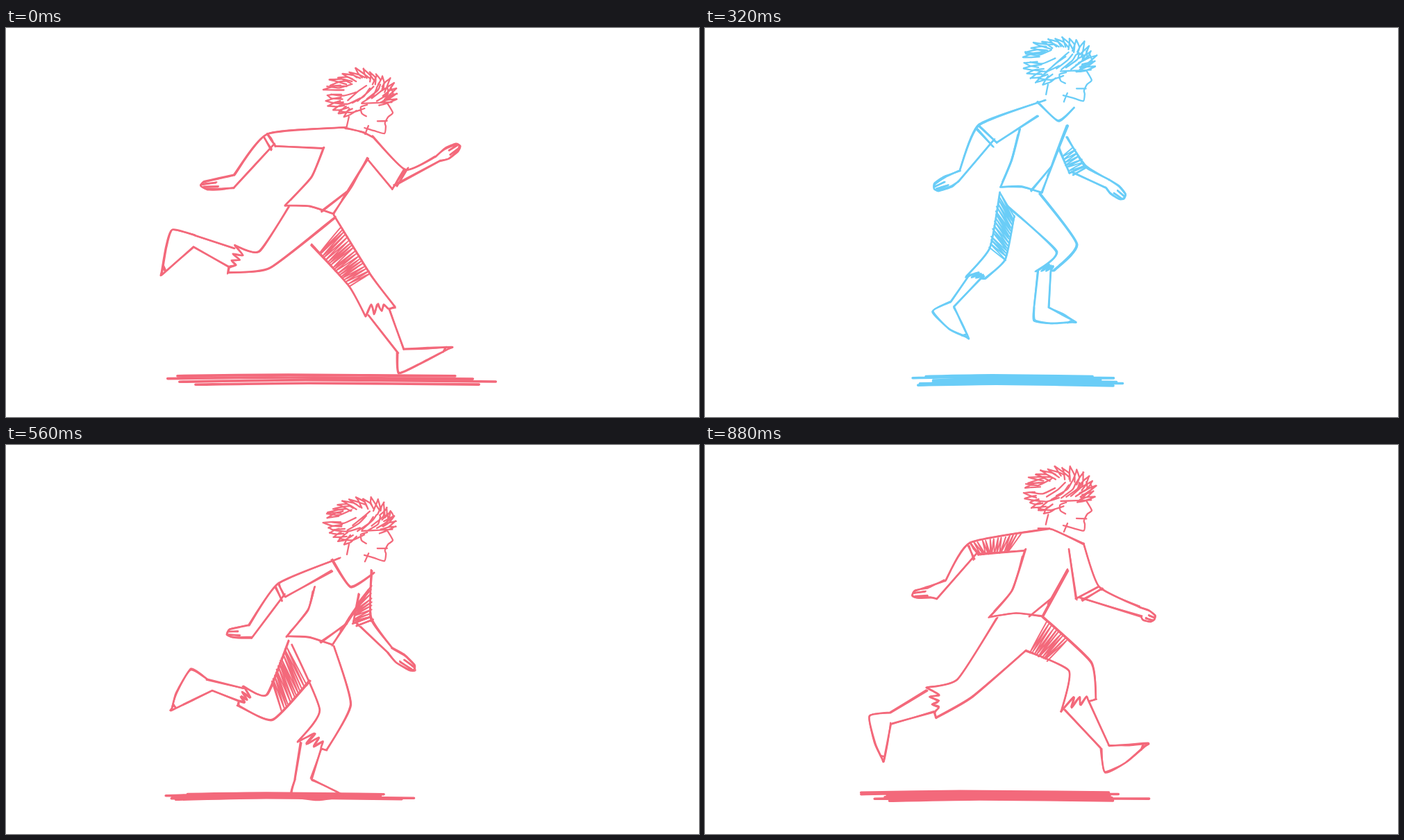
An HTML page that plays this animation: 998x561 px, repeating every 0.96 s.

```html
<!DOCTYPE html>
<html lang="en">
<head>
<meta charset="utf-8">
<title>Run cycle</title>
<style>
html, body { margin: 0; width: 100%; height: 100%; overflow: hidden; background: #fff; }
svg { display: block; width: 998px; height: 561px; }
path { fill: none; stroke-linecap: round; stroke-linejoin: round; }
g { visibility: hidden; animation: show 960ms step-end infinite; }
@keyframes show {
  0% { visibility: visible; }
  8.33333%, 100% { visibility: hidden; }
}
</style>
</head>
<body>
<svg id="stage" viewBox="0 0 998 561"></svg>
<script>
const RED = '#f3697b', GREEN = '#78c475', LIME = '#aad471', BLUE = '#6acdf7';
const STEP = 80, COUNT = 12;

// torso: left shoulder, collar, right shoulder, back (3), front (2)
// arms: outer and inner side of shoulder, elbow, wrist; then the fingertip
// legs: front and back side of hip, knee, cuff, ankle; then toe, sole, heel
const contact = {
  color: RED, head: 0, ground: [233, 705, 501, 513], lines: 4, shade: [0.2, 1], shadedArm: '',
  torso: [488, 144, 513, 150, 528, 157, 458, 172, 440, 215, 402, 256, 521, 188, 472, 268],
  armL: [490, 143, 455, 174, 376, 153, 388, 170, 328, 212, 328, 231, 281, 228],
  armR: [528, 156, 521, 190, 575, 204, 556, 232, 618, 186, 624, 192, 654, 170],
  near: [474, 272, 407, 258, 380, 346, 364, 322, 320, 353, 330, 314, 270, 316, 272, 299, 224, 356, 231, 316, 240, 291],
  far: [472, 270, 440, 312, 524, 355, 494, 372, 560, 402, 518, 416, 573, 463, 564, 468, 642, 460, 600, 482, 566, 497]
};
const down = {
  color: GREEN, head: 15, ground: [211, 597, 503, 512], lines: 5, shade: [0.1, 1], shadedArm: 'armL',
  torso: [470, 165, 490, 163, 525, 176, 480, 168, 446, 215, 408, 271, 497, 236, 468, 282],
  armL: [470, 165, 447, 206, 392, 196, 410, 218, 362, 268, 372, 280, 335, 282],
  armR: [525, 176, 494, 190, 528, 250, 502, 262, 566, 299, 552, 306, 604, 328],
  near: [465, 290, 404, 280, 382, 397, 373, 372, 335, 378, 343, 346, 292, 349, 290, 335, 231, 388, 243, 355, 264, 323],
  far: [470, 287, 447, 335, 508, 390, 472, 386, 463, 444, 437, 424, 454, 475, 434, 468, 509, 494, 460, 498, 421, 498]
};
const pass = {
  color: BLUE, head: -3, ground: [353, 548, 502, 513], lines: 6, shade: [0, 1], shadedArm: 'armR',
  torso: [470, 155, 510, 178, 518, 150, 446, 205, 436, 240, 426, 277, 514, 185, 480, 283],
  armL: [490, 150, 494, 166, 407, 204, 438, 228, 394, 275, 405, 280, 370, 307],
  armR: [496, 236, 488, 246, 526, 261, 512, 265, 538, 268, 524, 274, 552, 300],
  near: [475, 284, 422, 285, 522, 370, 490, 376, 448, 396, 438, 380, 412, 432, 378, 432, 425, 484, 396, 456, 378, 434],
  far: [440, 312, 424, 290, 480, 368, 452, 360, 482, 398, 434, 428, 450, 468, 434, 470, 498, 497, 460, 500, 421, 492]
};
const up = {
  color: BLUE, head: -27, ground: [245, 655, 501, 516], lines: 6, shade: [0.05, 0.5], shadedArm: 'armR',
  torso: [488, 122, 508, 155, 545, 143, 462, 150, 447, 205, 425, 246, 530, 160, 490, 256],
  armL: [490, 122, 465, 153, 382, 141, 402, 166, 340, 200, 324, 228, 290, 222],
  armR: [545, 143, 530, 165, 570, 200, 538, 218, 626, 234, 630, 250, 655, 256],
  near: [490, 256, 450, 292, 550, 318, 522, 333, 558, 368, 516, 385, 578, 437, 570, 438, 643, 428, 600, 460, 572, 472],
  far: [450, 296, 425, 248, 385, 364, 368, 338, 324, 388, 319, 352, 267, 400, 272, 385, 262, 462, 243, 432, 236, 388]
};
const down2 = {
  color: RED, head: 15, ground: [230, 587, 503, 510], lines: 5, shade: [0.1, 0.75], shadedArm: 'armR',
  torso: [470, 165, 496, 204, 530, 184, 444, 205, 435, 238, 404, 276, 522, 210, 470, 288],
  armL: [480, 163, 470, 182, 392, 200, 402, 219, 350, 260, 354, 278, 319, 272],
  armR: [526, 180, 508, 215, 526, 248, 500, 257, 556, 292, 550, 300, 588, 324],
  near: [472, 290, 412, 288, 496, 374, 452, 382, 462, 440, 420, 428, 440, 482, 416, 482, 488, 506, 450, 511, 412, 505],
  far: [438, 340, 407, 282, 384, 397, 375, 360, 334, 375, 342, 348, 297, 354, 290, 338, 238, 383, 245, 357, 266, 324]
};
const pass2 = {
  color: LIME, head: -4, ground: [281, 559, 502, 508], lines: 4, shade: [0.1, 1], shadedArm: 'armL',
  torso: [480, 148, 500, 149, 520, 158, 460, 168, 442, 230, 414, 278, 490, 210, 475, 288],
  armL: [480, 148, 450, 200, 406, 204, 430, 228, 398, 262, 413, 270, 404, 298],
  armR: [520, 158, 494, 185, 512, 236, 482, 246, 546, 268, 538, 284, 554, 313],
  near: [470, 288, 410, 282, 452, 392, 414, 380, 408, 438, 386, 418, 381, 470, 350, 470, 410, 506, 372, 502, 348, 478],
  far: [470, 288, 462, 340, 466, 406, 450, 390, 410, 438, 395, 404, 366, 428, 333, 420, 356, 468, 345, 470, 332, 420]
};
const up2 = {
  color: RED, head: -28, ground: [225, 640, 500, 512], lines: 6, shade: [0.1, 0.5], shadedArm: 'armL',
  torso: [480, 121, 500, 122, 545, 143, 462, 150, 442, 210, 410, 248, 522, 180, 486, 247],
  armL: [495, 121, 460, 152, 382, 141, 394, 158, 346, 196, 334, 222, 299, 217],
  armR: [545, 142, 524, 150, 567, 204, 534, 222, 626, 234, 628, 248, 647, 252],
  near: [462, 296, 420, 250, 384, 364, 364, 338, 333, 394, 319, 350, 268, 402, 267, 386, 257, 456, 245, 430, 237, 391],
  far: [486, 248, 462, 296, 556, 314, 524, 326, 563, 366, 513, 384, 582, 434, 570, 437, 638, 430, 606, 458, 576, 472]
};

const lerp = (a, b, t) => a + (b - a) * t;
const between = (p, q, t) => [lerp(p[0], q[0], t), lerp(p[1], q[1], t)];
const points = n => Array.from({ length: n.length / 2 }, (_, i) => [n[2 * i], n[2 * i + 1]]);

function rng(seed) {
  return () => {
    seed = (seed * 1664525 + 1013904223) >>> 0;
    return seed / 4294967296;
  };
}

function blend(a, b, color, dy) {
  const out = { ...a, color, head: (a.head + b.head) / 2 + dy };
  for (const k of ['torso', 'armL', 'armR', 'near', 'far'])
    out[k] = a[k].map((v, i) => lerp(v, b[k][i], 0.5) + (i % 2 ? dy : 0));
  out.ground = a.ground.map((v, i) => lerp(v, b.ground[i], 0.5));
  return out;
}

// Zigzag between the edges a-b and c-d.
function zigzag(a, b, c, d, n) {
  const pts = [];
  for (let i = 0; i <= n; i++) pts.push(between(a, b, i / n), between(c, d, i / n));
  return pts;
}

function shadeLimb(limb, from, to, gap) {
  const [a, b, c, d] = points(limb);
  const n = Math.ceil(Math.hypot(a[0] - c[0], a[1] - c[1]) * (to - from) / gap);
  return zigzag(between(a, c, from), between(a, c, to), between(b, d, from), between(b, d, to), n);
}

function leg(n) {
  const [hf, hb, kf, kb, cf, cb, af, ab, toe, sole, heel] = points(n);
  const shin = between(cf, cb, 0.2), calf = between(cf, cb, 0.9);
  const tear = [0.2, 0.45, 0.7].flatMap((t, i) => [between(cf, cb, t), between(between(cf, cb, t + 0.1), kf, 0.15 + i * 0.05)]);
  return [
    [hf, kf, cf], [hb, kb, cb], [cf, ...tear, cb], [shin, af], [calf, ab],
    [af, between(af, toe, 0.5), toe, between(toe, sole, 0.15), sole, heel, ab],
    [between(toe, af, 0.12), between(toe, sole, 0.3)]
  ];
}

function arm(n) {
  const [so, si, eo, ei, wo, wi, tip] = points(n);
  const mid = between(wo, wi, 0.5), dx = tip[0] - mid[0], dy = tip[1] - mid[1];
  const len = Math.hypot(dx, dy), side = Math.sign(dx * (wo[1] - wi[1]) - dy * (wo[0] - wi[0])) || 1;
  const at = (t, w) => [mid[0] + dx * t - dy / len * w * side, mid[1] + dy * t + dx / len * w * side];
  return [
    [so, eo, wo], [si, ei], [between(eo, ei, 0.85), wi],
    [wo, at(0.45, 8), at(0.9, 6), tip, at(0.85, -5), at(0.4, -8), wi],
    [eo, between(eo, ei, 0.5), ei], [between(eo, wo, 0.08), between(ei, wi, 0.1)],
    [at(0.95, 3), at(0.55, 2)], [at(0.92, -2), at(0.5, -4)]
  ];
}

function torso(n) {
  const [left, collar, right, back, waist, hemL, front, hemR] = points(n);
  const bottom = between(hemL, hemR, 0.5);
  return [
    [left, collar, right], [back, waist, hemL], [between(back, waist, 0.2), waist, between(waist, hemL, 0.8)],
    [front, between(front, hemR, 0.5), hemR], [front, between(front, hemR, 0.75)],
    [hemL, [bottom[0], bottom[1] - 5], hemR],
    [between(hemL, hemR, 0.75), between(hemR, front, 0.4)]
  ];
}

function face(dy) {
  const at = list => points(list).map(([x, y]) => [x, y + dy]);
  return [
    [549, 108, 557, 122, 550, 128, 546, 137, 547, 142, 545, 152, 530, 148, 516, 144],
    [535, 134, 549, 134], [520, 111, 511, 114, 512, 123, 519, 127],
    [494, 128, 491, 143], [522, 141, 517, 153], [512, 109, 556, 107]
  ].map(at);
}

// Tufts around the skull, swept back, with loose strands above the brow.
function hair(dy, rand) {
  const cx = 511, cy = 96 + dy, out = [];
  const ring = (deg, r) => {
    const a = deg * Math.PI / 180;
    return [cx + Math.cos(a) * 52 * r, cy + Math.sin(a) * 37 * r];
  };
  for (let a = 118; a < 372; a += 12) {
    const tip = ring(a, 0.9 + rand() * 0.16), lean = a > 180 ? 20 : -8;
    const r = 0.5 + rand() * 0.2;
    out.push([ring(a + lean - 9, r), ring(a + lean * 0.4 - 5, 0.83), tip]);
    out.push([tip, ring(a + lean * 0.5 + 6, 0.78), ring(a + lean + 10, r)]);
  }
  for (let i = 0; i < 8; i++) {
    const x = 492 + i * 7, y = cy + 14 - rand() * 9;
    out.push([[x, y], [x + 16, y - 9 - rand() * 5], [x + 27 - i * 2, y - 21]]);
  }
  for (let i = 0; i < 4; i++) {
    const x = 462 + i * 6, y = cy - 12 + i * 12;
    out.push([[x, y], [x + 18, y + 2], [x + 36, y - 3 - rand() * 5]]);
  }
  return out;
}

function ground([x0, x1, y0, y1], n, rand) {
  return Array.from({ length: n }, (_, i) => {
    const y = lerp(y0, y1, i / (n - 1)), w = x1 - x0;
    const l = i === 1 ? x0 : x0 + rand() * w * 0.12;
    const r = i === n - 2 ? x1 : x1 - rand() * w * 0.15;
    return [[l, y + 1], [lerp(l, r, 0.4), y - 1], [r, y + 1]];
  });
}

function curve(p, rand, wobble) {
  const q = p.map(([x, y]) => [x + (rand() - 0.5) * wobble, y + (rand() - 0.5) * wobble]);
  const f = (x, y) => x.toFixed(1) + ' ' + y.toFixed(1);
  let d = 'M' + f(...q[0]);
  for (let i = 0; i < q.length - 1; i++) {
    const a = q[i - 1] || q[i], b = q[i], c = q[i + 1], e = q[i + 2] || c, k = 0.1;
    d += 'C' + f(b[0] + (c[0] - a[0]) * k, b[1] + (c[1] - a[1]) * k) + ' ' +
      f(c[0] - (e[0] - b[0]) * k, c[1] - (e[1] - b[1]) * k) + ' ' + f(...c);
  }
  return d;
}

const svgNode = (name, attrs, parent) => {
  const el = document.createElementNS('http://www.w3.org/2000/svg', name);
  for (const k in attrs) el.setAttribute(k, attrs[k]);
  return parent.appendChild(el);
};

function draw(pose, i) {
  const rand = rng(i * 7919 + 17);
  const g = svgNode('g', { stroke: pose.color, style: `animation-delay:${(i - COUNT) * STEP}ms` }, stage);
  const ink = (strokes, width, wobble) => svgNode('path', {
    d: strokes.map(s => curve(s, rand, wobble)).join(''), 'stroke-width': width
  }, g);
  const body = [...torso(pose.torso), ...arm(pose.armL), ...arm(pose.armR), ...leg(pose.near), ...leg(pose.far)];
  const shades = [shadeLimb(pose.far, ...pose.shade, 4.5)];
  if (pose.shadedArm) shades.push(shadeLimb(pose[pose.shadedArm], 0.35, 1, 6));
  ink(ground(pose.ground, pose.lines, rand), 3.6, 1);
  ink(shades, 2, 2);
  ink(body, 2.7, 0.6);
  ink(body, 2, 3.2);
  ink([...hair(pose.head, rand), ...face(pose.head)], 2.3, 0.8);
}

const stage = document.getElementById('stage');
const contact2 = {
  ...contact, near: contact.far, far: contact.near,
  ground: [202, 713, 501, 513], lines: 5, shade: [0.1, 0.6]
};
[
  contact, down, blend(down, pass, GREEN, 0), pass, blend(pass, up, BLUE, -32), up,
  contact2, down2, blend(down2, pass2, LIME, 0), pass2, blend(pass2, up2, LIME, -29), up2
].forEach(draw);
</script>
</body>
</html>
```
